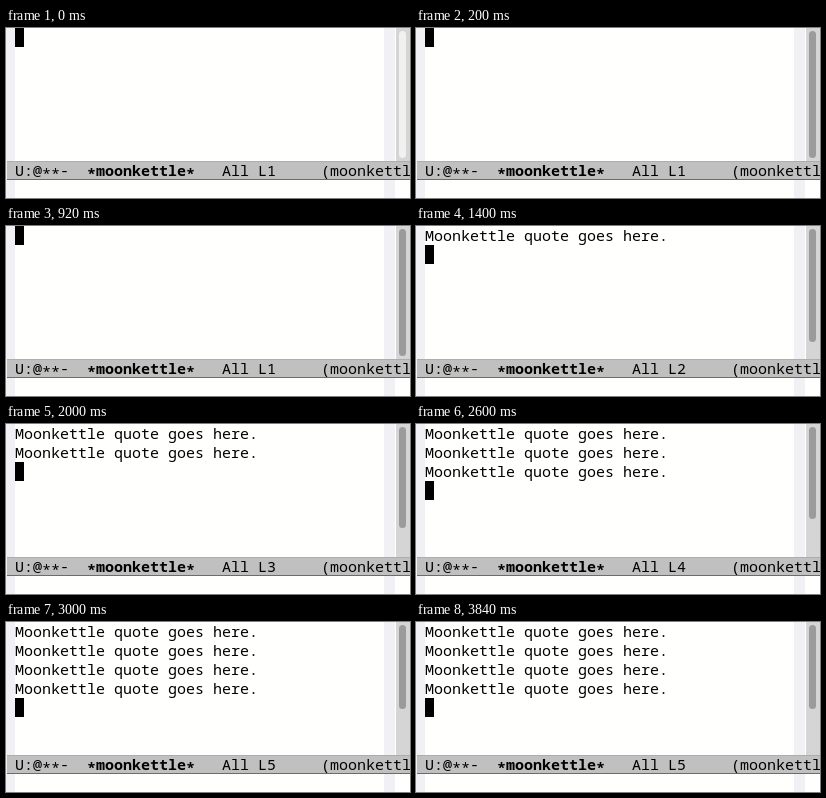
These frames come from a looping animation (404 by 170 pixels, 4.4 s). An HTML page:

```html
<!DOCTYPE html>
<html lang="en">
<head>
<meta charset="utf-8">
<title>Editor buffer</title>
<style>
  html, body { margin: 0; width: 100%; height: 100%; overflow: hidden; background: #fffffd; }
  svg { display: block; }
  text { font: 15px "Noto Sans Mono", "DejaVu Sans Mono", monospace; fill: #000; white-space: pre; }
  .bold { font-weight: 700; }
  .paper { fill: #fffffd; }
  .fringe { fill: #f0f0f5; }
  .track { fill: #d5d5d5; }

  /* each inserted line moves the caret down by one 19px row */
  .caret, .digits, .thumb { animation: 4400ms step-end infinite; }
  .caret { animation-name: down; }
  .digits { animation-name: up; }
  .thumb { animation-name: shrink; }

  @keyframes down {
    0% { transform: translateY(0); }
    31.818% { transform: translateY(19px); }
    45.4545% { transform: translateY(38px); }
    59.0909% { transform: translateY(57px); }
    68.1818%, 100% { transform: translateY(76px); }
  }
  @keyframes up {
    0% { transform: translateY(0); }
    31.818% { transform: translateY(-19px); }
    45.4545% { transform: translateY(-38px); }
    59.0909% { transform: translateY(-57px); }
    68.1818%, 100% { transform: translateY(-76px); }
  }
  @keyframes shrink {
    0% { height: 127px; fill: #f1f1ef; }
    4.5454% { height: 127px; fill: #9b9b9b; }
    31.818% { height: 113px; fill: #9b9b9b; }
    45.4545% { height: 101px; fill: #9b9b9b; }
    59.0909% { height: 92px; fill: #9b9b9b; }
    68.1818%, 100% { height: 84px; fill: #9b9b9b; }
  }
</style>
</head>
<body>
<svg width="404" height="170" viewBox="0 0 404 170">
  <rect class="paper" width="404" height="170"/>

  <text x="9" y="15">Moonkettle quote goes here.</text>
  <text x="9" y="34">Moonkettle quote goes here.</text>
  <text x="9" y="53">Moonkettle quote goes here.</text>
  <text x="9" y="72">Moonkettle quote goes here.</text>

  <!-- the sheet below the caret hides lines not yet inserted -->
  <g class="caret">
    <rect class="paper" x="9" width="369" height="133"/>
    <rect x="9" width="9" height="19"/>
  </g>

  <rect class="fringe" width="9" height="170"/>
  <rect class="fringe" x="378" width="11" height="170"/>
  <rect class="track" x="390" width="14" height="133"/>
  <rect class="thumb" x="393" y="3" width="7" height="127" rx="3.5"/>

  <g>
    <rect x="1" y="133" width="403" height="19" fill="#c0c0c0"/>
    <rect x="1" y="133" width="403" height="1" fill="#adadad"/>
    <rect x="1" y="151" width="403" height="1" fill="#6c6c6c"/>
    <text x="9" y="148">U:@<tspan dy="3">**</tspan><tspan dy="-3">-</tspan></text>
    <text class="bold" x="81" y="148"><tspan dy="3">*</tspan><tspan dy="-3">moonkettle</tspan><tspan dy="3">*</tspan></text>
    <text x="216" y="148">All L</text>
    <svg x="261" y="135" width="9" height="15" overflow="hidden">
      <g class="digits">
        <text y="13">1</text>
        <text y="32">2</text>
        <text y="51">3</text>
        <text y="70">4</text>
        <text y="89">5</text>
      </g>
    </svg>
    <text x="315" y="148">(moonkettle</text>
  </g>
</svg>
</body>
</html>
```
